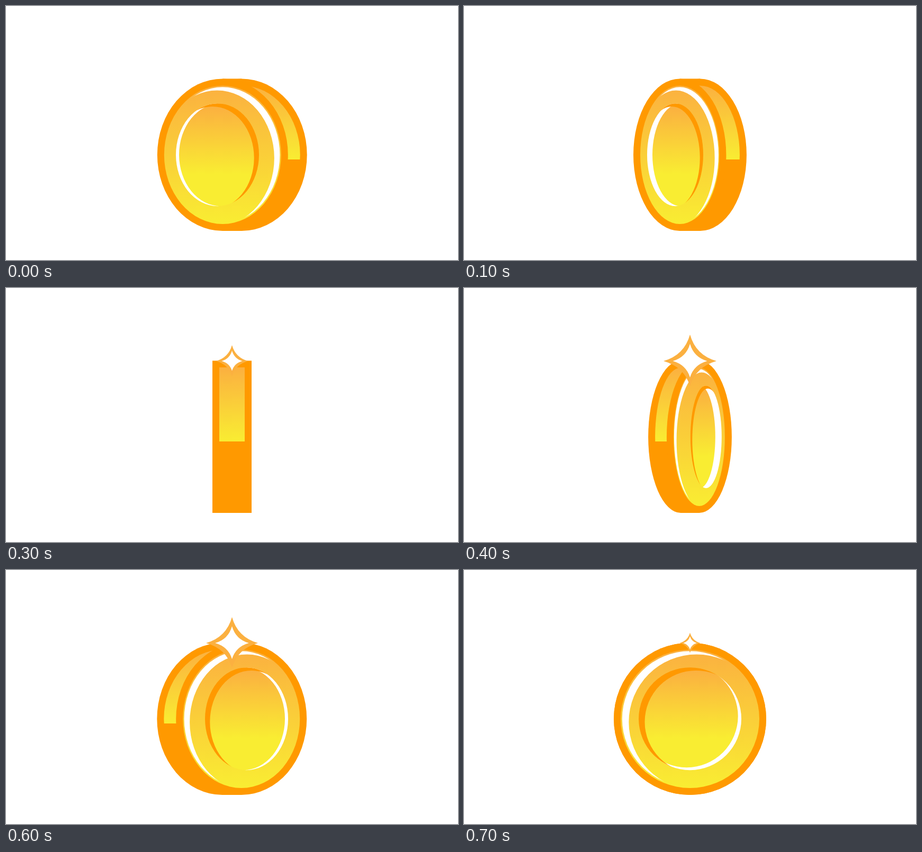
An HTML page with a canvas for the animation above (800 ms loop, 854 by 480 pixels).

```html
<!DOCTYPE html>
<html lang="en">
<head>
<meta charset="utf-8">
<title>Spinning coin</title>
<style>
  html, body { margin: 0; width: 100%; height: 100%; overflow: hidden; background: #fff; }
  canvas { display: block; }
</style>
</head>
<body>
<canvas id="stage" width="854" height="480"></canvas>
<script>
const ctx = document.getElementById('stage').getContext('2d');
const STEP = 100;
const CX = 427, CY = 281.2, RY = 143.8, RIM = 13;
const ORANGE = '#ff9900', AMBER = '#fbb040', YELLOW = '#f9ed32';

// face: centre and half width; back: centre of the far side;
// disc: centre and half width of the inner disc; shine: its white offset
const WIDE = { face: [409.3, 123.5], back: 445.2, disc: [399.5, 78.5], shine: [6, 0] };
const MID = { face: [407.7, 87.7], back: 446.2, disc: [399, 53], shine: [10, 0] };
const SLIM = { face: [409.6, 61.5], back: 444.4, disc: [396.7, 29.5], shine: [12, 0] };
const FRONT = { face: [CX, 144], back: CX, disc: [CX, 97], shine: [6.3, -5] };

const POSES = [
  { view: WIDE, star: 0 },
  { view: MID, star: 0 },
  { view: SLIM, star: 12 },
  { view: null, star: 30 },
  { view: SLIM, star: 50, flip: true },
  { view: MID, star: 78.5, flip: true },
  { view: WIDE, star: 49, flip: true },
  { view: FRONT, star: 19.5, flip: true }
];

function fade(top, bottom) {
  const g = ctx.createLinearGradient(0, top, 0, bottom);
  g.addColorStop(0, AMBER);
  g.addColorStop(1, YELLOW);
  return g;
}

function oval(x, y, rx, ry) {
  ctx.moveTo(x + rx, y);
  ctx.ellipse(x, y, rx, ry, 0, 0, Math.PI * 2);
}

function fillOval(x, y, rx, ry, fill) {
  ctx.beginPath();
  oval(x, y, rx, ry);
  ctx.fillStyle = fill;
  ctx.fill();
}

// Part of oval a that lies outside oval b
function crescent(a, b, fill, bottom = 480) {
  ctx.save();
  ctx.beginPath();
  oval(...a);
  ctx.clip();
  ctx.beginPath();
  ctx.rect(0, 0, 854, bottom);
  ctx.clip();
  ctx.beginPath();
  ctx.rect(0, 0, 854, 480);
  oval(...b);
  ctx.fillStyle = fill;
  ctx.fill('evenodd');
  ctx.restore();
}

function drawCoin({ face: [x, rx], back, disc: [dx, drx], shine }) {
  fillOval(back, CY, rx, RY, ORANGE);
  fillOval(x, CY, rx, RY, ORANGE);
  ctx.fillRect(x, CY - RY, back - x, RY * 2);

  const inner = rx - RIM, ry = RY - RIM;
  if (back > x) {
    crescent([back, CY, inner, ry], [x, CY, rx, RY], fade(150, 290), 290);
  }
  fillOval(x, CY, inner, ry, fade(150, 412));

  const k = inner / ry;
  crescent([x, CY, 128 * k, 128], [x - 12.5 * k, CY + 6.3, 128 * k, 128], '#fff');

  const dk = drx / 97, ring = [dx, CY, drx, 97];
  fillOval(...ring, fade(190, 318));
  crescent(ring, [dx + shine[0], CY + shine[1], drx, 97], '#fff');
  crescent(ring, [dx - 11.5 * dk, CY + 5.7, drx, 97], ORANGE);
}

function drawEdge() {
  ctx.fillStyle = ORANGE;
  ctx.fillRect(390, CY - RY, 74, RY * 2);
  ctx.fillStyle = fade(150, 290);
  ctx.fillRect(403, 150, 48, 140);
}

function starPath(r, fill) {
  const c = r * 0.22, y = 138;
  ctx.beginPath();
  ctx.moveTo(CX, y - r);
  ctx.quadraticCurveTo(CX + c, y - c, CX + r, y);
  ctx.quadraticCurveTo(CX + c, y + c, CX, y + r * 0.95);
  ctx.quadraticCurveTo(CX - c, y + c, CX - r, y);
  ctx.quadraticCurveTo(CX - c, y - c, CX, y - r);
  ctx.fillStyle = fill;
  ctx.fill();
}

function draw(now) {
  const { view, star, flip } = POSES[Math.floor(now / STEP) % POSES.length];
  ctx.fillStyle = '#fff';
  ctx.fillRect(0, 0, 854, 480);

  ctx.save();
  if (flip) {
    ctx.translate(CX * 2, 0);
    ctx.scale(-1, 1);
  }
  if (view) drawCoin(view);
  else drawEdge();
  ctx.restore();

  if (star) {
    starPath(star, AMBER);
    starPath(star * 0.65, '#fff');
  }
}

const start = performance.now();
function tick() {
  draw(performance.now() - start);
  requestAnimationFrame(tick);
}
tick();
</script>
</body>
</html>
```
